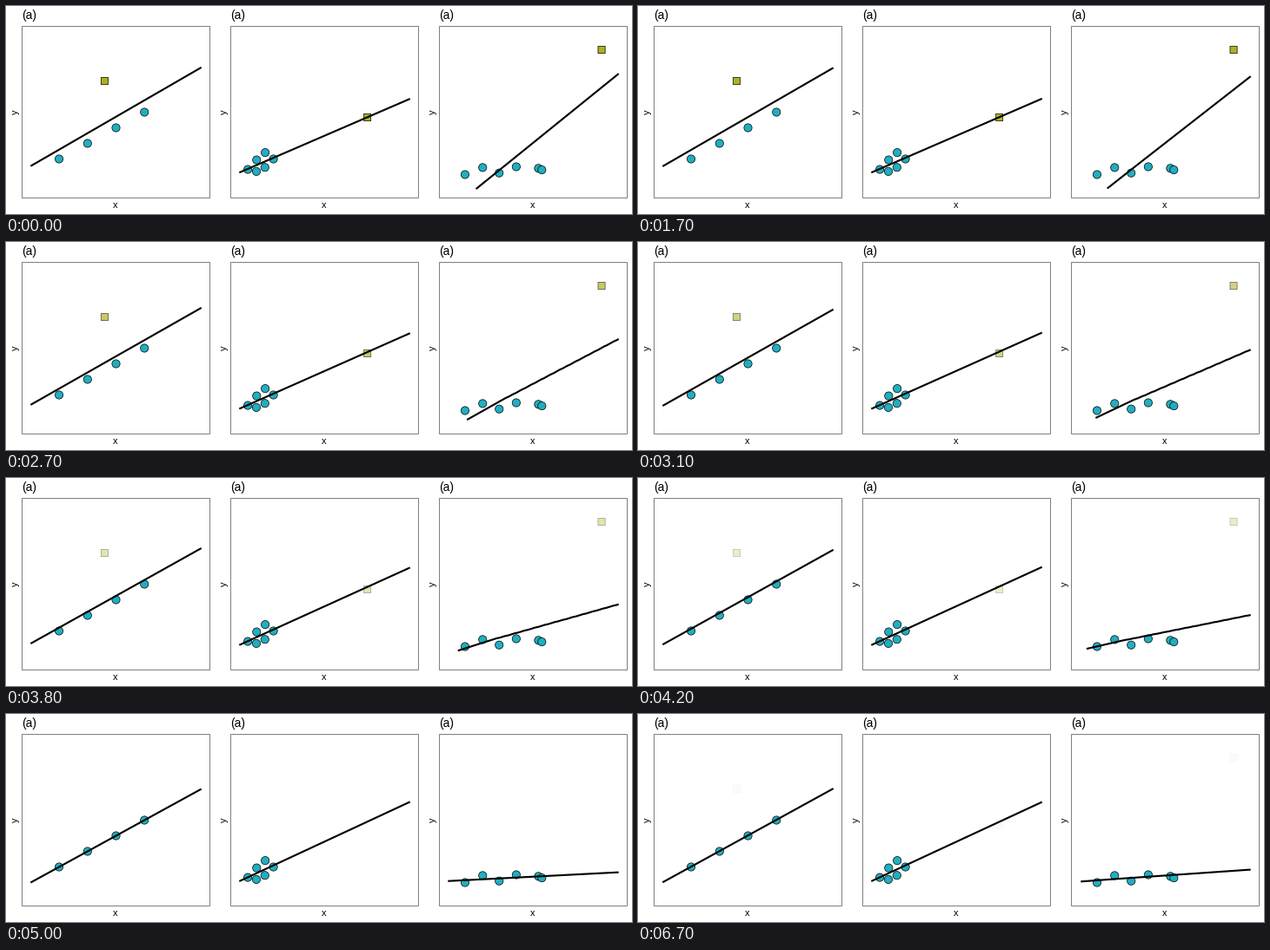
A matplotlib script for the animation above (6.8 s loop, 720 by 240 pixels).

```python
import matplotlib.pyplot as plt
import numpy as np
from matplotlib.animation import FuncAnimation
from matplotlib.patches import Circle, Rectangle

W, H, DPI = 720, 240, 72
FRAMES, INTERVAL = 68, 100
HOLD, STEPS = 16, 34

TEAL, OLIVE, GREY = "#1fafc1", "#adb01e", "#7f7f7f"
RADIUS, SIDE, STROKE = 4.62, 8.19, 0.71

# Panel box within each 240 px column; data run over 0..6 and 0..10
LEFT, TOP, WIDTH, HEIGHT = 18.5, 23.5, 216, 198
X_MAX, Y_MAX = 6, 10

# Regular points, then the outlier
PANELS = [
    ([(1, 2), (2, 3), (3, 4), (4, 5)], (2.6, 7)),
    ([(0.3, 1.33), (0.61, 1.94), (0.91, 2.41), (1.2, 2.0), (0.9, 1.46),
      (0.6, 1.2)], (4.5, 4.667)),
    ([(0.6, 1.0), (1.22, 1.45), (1.8, 1.1), (2.4, 1.5), (3.18, 1.4),
      (3.3, 1.3)], (5.4, 9.0)),
]

plt.rcParams["font.family"] = "Liberation Sans"
fig = plt.figure(figsize=(W / DPI, H / DPI), dpi=DPI, facecolor="white")
ax = fig.add_axes([0, 0, 1, 1])
ax.set_xlim(0, W)
ax.set_ylim(H, 0)
ax.axis("off")


def to_px(points, col):
    """Data units to stage pixels, with 5% padding inside the panel."""
    x, y = np.asarray(points, float).T
    px = 240 * col + LEFT + WIDTH * (0.05 + x / X_MAX) / 1.1
    py = TOP + HEIGHT - HEIGHT * (0.05 + y / Y_MAX) / 1.1
    return np.column_stack([px, py])


def fit_line(points, count=80):
    """Least-squares line over the full x range, cut at the y limits."""
    x, y = np.asarray(points, float).T
    slope, base = np.polyfit(x, y, 1)
    xs = np.linspace(0, X_MAX, count)
    ys = base + slope * xs
    xs = xs[(ys >= 0) & (ys <= Y_MAX)]
    missing = count - len(xs)
    if missing:
        # Split segments in the upper part to get back to the full count
        cut = np.linspace(18, len(xs) - 3, missing).astype(int)
        xs = np.sort(np.append(xs, (xs[cut] + xs[cut + 1]) / 2))
    return np.column_stack([xs, base + slope * xs])


def draw_panel(col, points, outlier):
    x0 = 240 * col
    # Just under the half pixel, so the border snaps to the left and top
    ax.add_patch(Rectangle((x0 + LEFT - 0.2, TOP - 0.2), WIDTH, HEIGHT,
                           fill=False, ec=GREY, lw=1))
    ax.text(x0 + 17.8, 15, "(a)", size=13.8, va="baseline")
    ax.text(x0 + 126, 233, "x", size=11, ha="center", va="baseline")
    ax.text(x0 + 13.5, 122.5, "y", size=11, ha="center", va="baseline",
            rotation=90, rotation_mode="anchor")

    for center in to_px(points, col):
        ax.add_patch(Circle(center, RADIUS, fc=TEAL, ec="black", lw=STROKE,
                            zorder=2))
    corner = to_px([outlier], col)[0] - SIDE / 2
    square = ax.add_patch(Rectangle(corner, SIDE, SIDE, fc=OLIVE, ec="black",
                                    lw=STROKE, zorder=2, snap=False))
    line, = ax.plot([], [], color="black", lw=2.13, zorder=3,
                    solid_capstyle="butt", solid_joinstyle="round")
    start = to_px(fit_line(points + [outlier]), col)
    end = to_px(fit_line(points), col)
    return square, line, start, end


panels = [draw_panel(col, *data) for col, data in enumerate(PANELS)]


def update(i):
    # Hold, fade out linearly, hold, then one step back before the loop
    step = min(max(i - HOLD, 0), STEPS) - max(i - 66, 0)
    t = step / STEPS
    artists = []
    for square, line, start, end in panels:
        path = start + (end - start) * t
        line.set_data(path[:, 0], path[:, 1])
        square.set_alpha(1 - t)
        artists += [square, line]
    return artists


anim = FuncAnimation(fig, update, frames=FRAMES, interval=INTERVAL,
                     repeat=True, repeat_delay=0)
plt.show()
```
